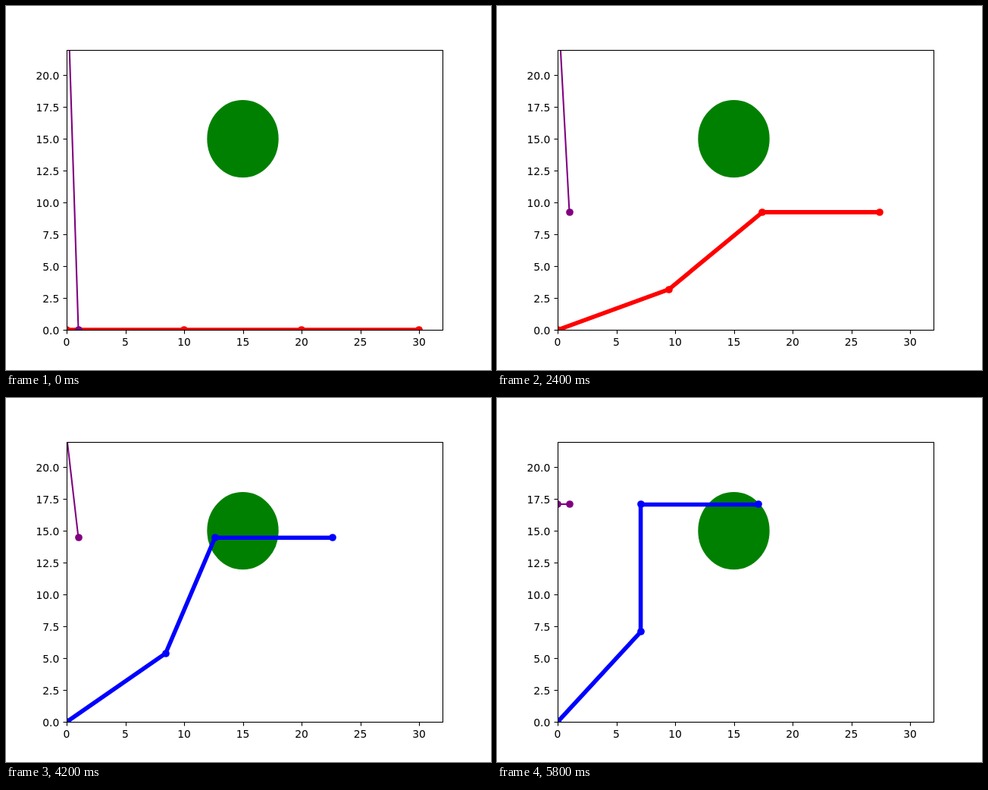
An HTML page that plays this animation: 640 px wide and 480 px high, repeating every 6 s.

```html
<!DOCTYPE html>
<html lang="en">
<head>
<meta charset="utf-8">
<title>Arm and obstacle</title>
<style>
  html, body { margin: 0; width: 100%; height: 100%; overflow: hidden; background: #fff; }
  svg { display: block; width: 640px; height: 480px; }
  text { font: 13.889px "DejaVu Sans", sans-serif; fill: #000; }
  .axis { fill: none; stroke: #000; stroke-width: 1.11; }
</style>
</head>
<body>
<svg id="stage" viewBox="0 0 640 480">
  <clipPath id="plot"><rect x="80" y="58" width="496" height="369"/></clipPath>
  <g id="data" clip-path="url(#plot)">
    <ellipse cx="312.5" cy="175.2" rx="46.5" ry="50.4" fill="#008000" stroke="#008000" stroke-width="1.39"/>
  </g>
  <g id="axes"><rect class="axis" x="80.5" y="58.5" width="496" height="369"/></g>
</svg>
<script>
const STEP_MS = 200, STEPS = 30, LINK = 10;
const OBSTACLE = { x: 15, y: 15, r: 3 };

const px = x => 80 + 15.5 * x;
const py = y => 427.2 - 16.8 * y;
const byId = id => document.getElementById(id);

function add(parent, tag, attrs, text = "") {
  const node = document.createElementNS("http://www.w3.org/2000/svg", tag);
  for (const [key, value] of Object.entries(attrs)) node.setAttribute(key, value);
  node.textContent = text;
  parent.append(node);
  return node;
}

function drawAxes() {
  const axes = byId("axes");
  for (let v = 0; v <= 30; v += 5) {
    add(axes, "path", { class: "axis", d: `M${Math.round(px(v)) + 0.5} 427.5v5` });
    add(axes, "text", { x: px(v), y: 448, "text-anchor": "middle" }, v);
  }
  for (let v = 0; v <= 20; v += 2.5) {
    const y = Math.round(py(v));
    add(axes, "path", { class: "axis", d: `M80.5 ${y + 0.5}h-5` });
    add(axes, "text", { x: 70.3, y: y + 6, "text-anchor": "end" }, v.toFixed(1));
  }
}

// A polyline with a round marker at every point.
function makeChain(count, width) {
  const group = add(byId("data"), "g", {});
  const line = add(group, "polyline", {
    fill: "none", "stroke-width": width, "stroke-linejoin": "round", "stroke-linecap": "square"
  });
  const dots = Array.from({ length: count }, () => add(group, "circle", { r: 4.86 }));
  return (points, color) => {
    const spots = points.map(([x, y]) => [px(x), py(y)]);
    const flat = points.every(p => p[1] === points[0][1]);
    line.setAttribute("points", spots.map(([x, y]) => [x, flat ? Math.round(y) : y]).join(" "));
    line.setAttribute("stroke", color);
    dots.forEach((dot, i) => {
      dot.setAttribute("cx", Math.round(spots[i][0]));
      dot.setAttribute("cy", Math.round(spots[i][1]));
      dot.setAttribute("fill", color);
    });
  };
}

function armPoints(angle) {
  const points = [[0, 0]];
  for (const a of [angle, 2 * angle, 0]) {
    const [x, y] = points.at(-1);
    points.push([x + LINK * Math.cos(a), y + LINK * Math.sin(a)]);
  }
  return points;
}

drawAxes();
const drawArm = makeChain(4, 5.56);
const drawGauge = makeChain(2, 2.08);

const hits = ([x, y]) => Math.hypot(x - OBSTACLE.x, y - OBSTACLE.y) < OBSTACLE.r;

function render(time) {
  const step = Math.floor(time / STEP_MS) % STEPS;
  const remaining = STEPS - 1 - step;
  const arm = armPoints(Math.PI / 4 * step / (STEPS - 1));
  const tipY = arm[3][1];
  drawArm(arm, arm.some(hits) ? "#0000ff" : "#ff0000");
  drawGauge([[1, tipY], [0, tipY + remaining]], "#800080");
}

const start = performance.now();
function tick() {
  render(performance.now() - start);
  requestAnimationFrame(tick);
}
tick();
</script>
</body>
</html>
```
